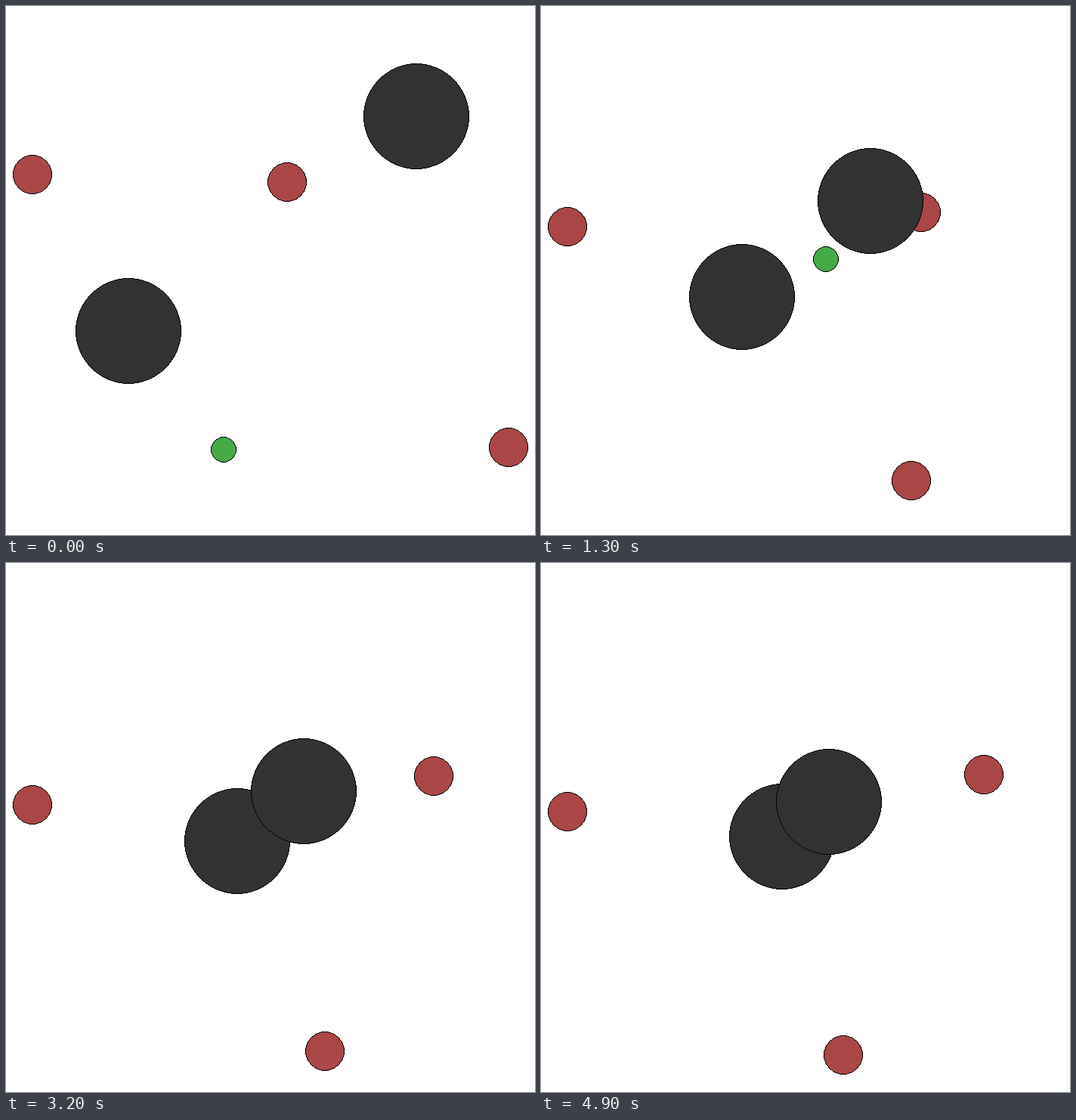
These frames come from a looping animation (700x700 px, 5 s). An HTML page:

```html
<!DOCTYPE html>
<html lang="en">
<head>
<meta charset="utf-8">
<title>Agents and obstacles</title>
<style>
  html, body { margin: 0; width: 100%; height: 100%; overflow: hidden; background: #fff; }
  svg { display: block; width: 100vw; height: 100vh; }
  path { shape-rendering: crispEdges; }
</style>
</head>
<body>
<svg id="stage" viewBox="0 0 700 700"></svg>
<script>
const STEP = 100, STEPS = 50;
const CENTER = { x: 350, y: 349.4 };
const EDGE = 315;        // the outermost agent always sits this far from the centre
const ZOOM_RATE = 0.1103;
const SPEED = EDGE * ZOOM_RATE;

// Distance covered after each step: thrust, drag and a speed limit of 1.
const travel = [0];
for (let k = 1, v = 0; k < STEPS; k++) {
  v = Math.min(1, v * 0.75 + 0.3);
  travel[k] = travel[k - 1] + v;
}

// Straight legs between turning points [step, x, y], in world units around the centre.
function along(...points) {
  return k => {
    let i = 1;
    while (i < points.length - 1 && points[i][0] < k) i++;
    const [ka, xa, ya] = points[i - 1], [kb, xb, yb] = points[i];
    const u = Math.min(1, (travel[k] - travel[ka]) / (travel[kb] - travel[ka]));
    return [xa + (xb - xa) * u, ya + (yb - ya) * u];
  };
}

const drift = (x, y, dx, dy) => k => [x + dx * SPEED * travel[k], y + dy * SPEED * travel[k]];
const fixed = (x, y) => drift(x, y, 0, 0);

const chaser = along([0, 22.5, -116], [9, 273, -116], [13, 343.8, -170],
                     [18, 464.7, -265], [30, 878.5, -274], [49, 1468.8, -428]);
const runner = along([0, -61.5, 238.1], [5, -36, 140.1], [13, 61.6, -31.1], [20, 98, -140]);

const RED = "#aa4646", GREEN = "#46aa46", GREY = "#323232";
const bodies = [
  { r: 26, fill: RED, at: drift(-EDGE, -126.4, -1, 0) },
  { r: 26, fill: RED, at: chaser },
  { r: 26, fill: RED, at: drift(EDGE, 235.5, 0, 1) },
  { r: 17, fill: GREEN, at: runner },
  { r: 70, fill: GREY, at: fixed(-187.7, 80.8) },
  { r: 70, fill: GREY, at: fixed(193.7, -203.2) }
];

// Midpoint circle on the pixel grid, spanning -r to r on both axes.
function pixelCircle(r) {
  let disc = "", rim = "";
  const row = (x, y) => {
    for (const top of [-y, y - 1]) {
      disc += `M${-x} ${top}h${2 * x}v1h${-2 * x}z`;
      for (const left of [-x, x - 1]) rim += `M${left} ${top}h1v1h-1z`;
    }
  };
  for (let x = 0, y = r, f = 1 - r; x < y;) {
    if (f >= 0) f -= 2 * --y;
    f += 2 * ++x + 1;
    row(x, y);
    row(y, x);
  }
  return { disc, rim };
}

const stage = document.getElementById("stage");
function add(parent, tag, attrs = {}) {
  const node = document.createElementNS(stage.namespaceURI, tag);
  for (const name in attrs) node.setAttribute(name, attrs[name]);
  return parent.appendChild(node);
}

for (const body of bodies) {
  const { disc, rim } = pixelCircle(body.r);
  body.node = add(stage, "g");
  add(body.node, "path", { d: disc, fill: body.fill });
  add(body.node, "path", { d: rim, fill: "#000" });
}

// The camera zooms out as the agents spread, while drawn sizes stay the same.
function draw(ms) {
  const k = Math.floor(ms / STEP) % STEPS;
  const zoom = 1 + ZOOM_RATE * travel[k];
  const place = (c, d) => Math.floor(c + d / zoom + 1e-6);
  for (const { node, at } of bodies) {
    const [x, y] = at(k);
    node.setAttribute("transform", `translate(${place(CENTER.x, x)} ${place(CENTER.y, y)})`);
  }
}

const start = performance.now();
function tick() {
  draw(performance.now() - start);
  requestAnimationFrame(tick);
}
tick();
</script>
</body>
</html>
```
